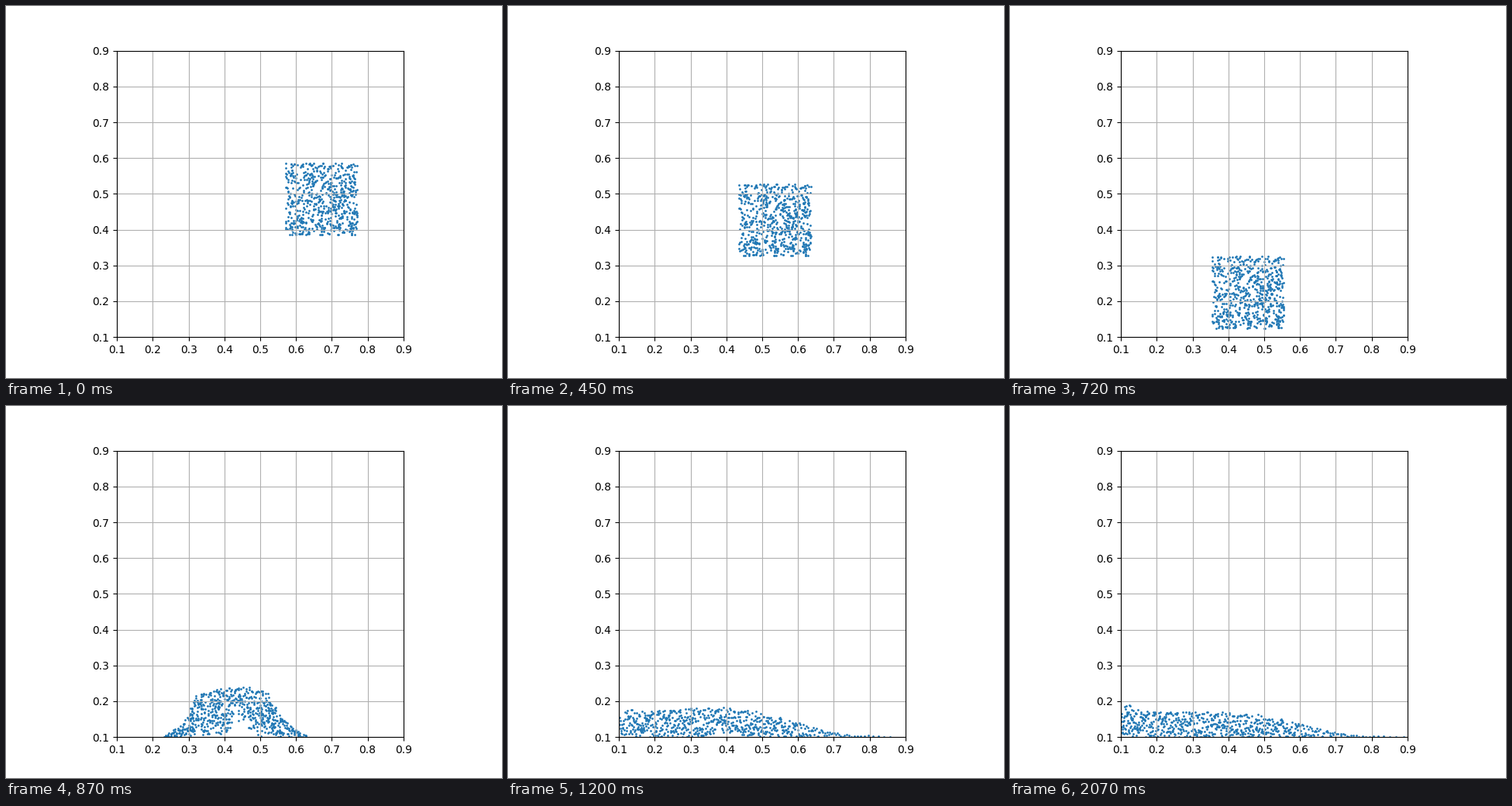
Animation, 640 px wide and 480 px high, one loop 2.1 s. Source, as a matplotlib script:

```python
import numpy as np
import matplotlib.pyplot as plt
from matplotlib.animation import FuncAnimation

FRAMES, INTERVAL = 70, 30
COUNT = 640
SIDE = 0.201
FLOOR = 0.099
HIT, SPLASH, REST = 24.8, 34, 54   # frames: impact, arch shape, pile at rest

rng = np.random.default_rng(4)
u = rng.random(COUNT)
v = rng.random(COUNT) ** 1.1       # a little sparser towards the top


def flight(n):
    """The thrown block in free flight."""
    cx = 0.6705 - 0.009 * n
    cy = 0.486 + 0.00769 * n - 0.000773 * n * n
    return np.array([cx + (u - 0.5) * SIDE, cy + (v - 0.5) * SIDE])


# Polar view of the block from the middle of its base: the angle runs
# along the heap, the radius across its thickness.
angle = np.arctan2(u - 0.5, v)
rank = (np.argsort(np.argsort(angle)) + 0.5) / COUNT
reach = np.minimum(1 / np.cos(angle), 0.5 / np.maximum(np.abs(np.sin(angle)), 1e-9))
layer = (np.hypot(u - 0.5, v) / reach) ** 2


def arch_top(x):
    width = np.where(x < 0.408, 0.158, 0.138)
    return 0.1 + 0.123 * np.exp(-0.5 * ((x - 0.408) / width) ** 2)


def arch_hollow(x):
    return FLOOR + 0.066 * np.maximum(0, np.minimum((x - 0.34) / 0.065, (0.525 - x) / 0.12))


def pile_top(x):
    slope = 0.07 / (1 + np.exp((x - 0.605) / 0.063))
    wall = 0.019 * np.exp(-((x - 0.12) / 0.035) ** 2)
    return 0.101 + slope + wall


def flat(x):
    return np.full_like(x, FLOOR)


def heap(top, bottom, right):
    """Spread the grains evenly between two outlines."""
    xs = np.linspace(0.102, right, 500)
    cdf = np.cumsum(top(xs) - bottom(xs))
    x = np.interp(rank, cdf / cdf[-1], xs)
    return np.array([x, bottom(x) + layer * (top(x) - bottom(x))])


arch = heap(arch_top, arch_hollow, 0.765)
pile = heap(pile_top, flat, 0.9)
block = flight(HIT)
span = SPLASH - HIT
# Low grains are pushed aside at once, high ones keep falling.
v_hit = np.array([(1 - v) * (arch[0] - block[0]) / span - v * 0.009, -0.031 * v])
v_splash = 4 * (pile - arch) / (REST - SPLASH)
creeping = (rng.random(COUNT) < 0.04) & (pile[0] > 0.15) & (pile[0] < 0.73)


def collapse(n):
    s = (n - HIT) / span
    return ((1 + 2 * s) * (1 - s) ** 2 * block + s * (1 - s) ** 2 * span * v_hit
            + s * s * (3 - 2 * s) * arch + s * s * (s - 1) * span * v_splash)


def settle(n):
    s = min((n - SPLASH) / (REST - SPLASH), 1)
    pos = arch + (pile - arch) * (1 - (1 - s) ** 4)
    # A few grains still slip in two short bursts.
    slips = np.clip(n - 54, 0, 4) + np.clip(n - 64, 0, 5)
    pos[0] += creeping * 0.0005 * slips
    return pos


def grains(n):
    if n < HIT:
        return flight(n)
    x, y = collapse(n) if n < SPLASH else settle(n)
    return np.array([np.maximum(x, 0.101), np.maximum(y, FLOOR)])


fig, ax = plt.subplots(figsize=(6.4, 4.8), dpi=100)
ax.set_aspect("equal")
ax.set(xlim=(0.1, 0.9), ylim=(0.1, 0.9))
ticks = np.arange(1, 10) / 10
ax.set_xticks(ticks)
ax.set_yticks(ticks)
ax.grid(True)
dots = ax.scatter(*grains(0), s=1, color="#1f77b4")


def update(n):
    dots.set_offsets(grains(n).T)
    return (dots,)


anim = FuncAnimation(fig, update, frames=FRAMES, interval=INTERVAL,
                     repeat=True, repeat_delay=0)
plt.show()
```
